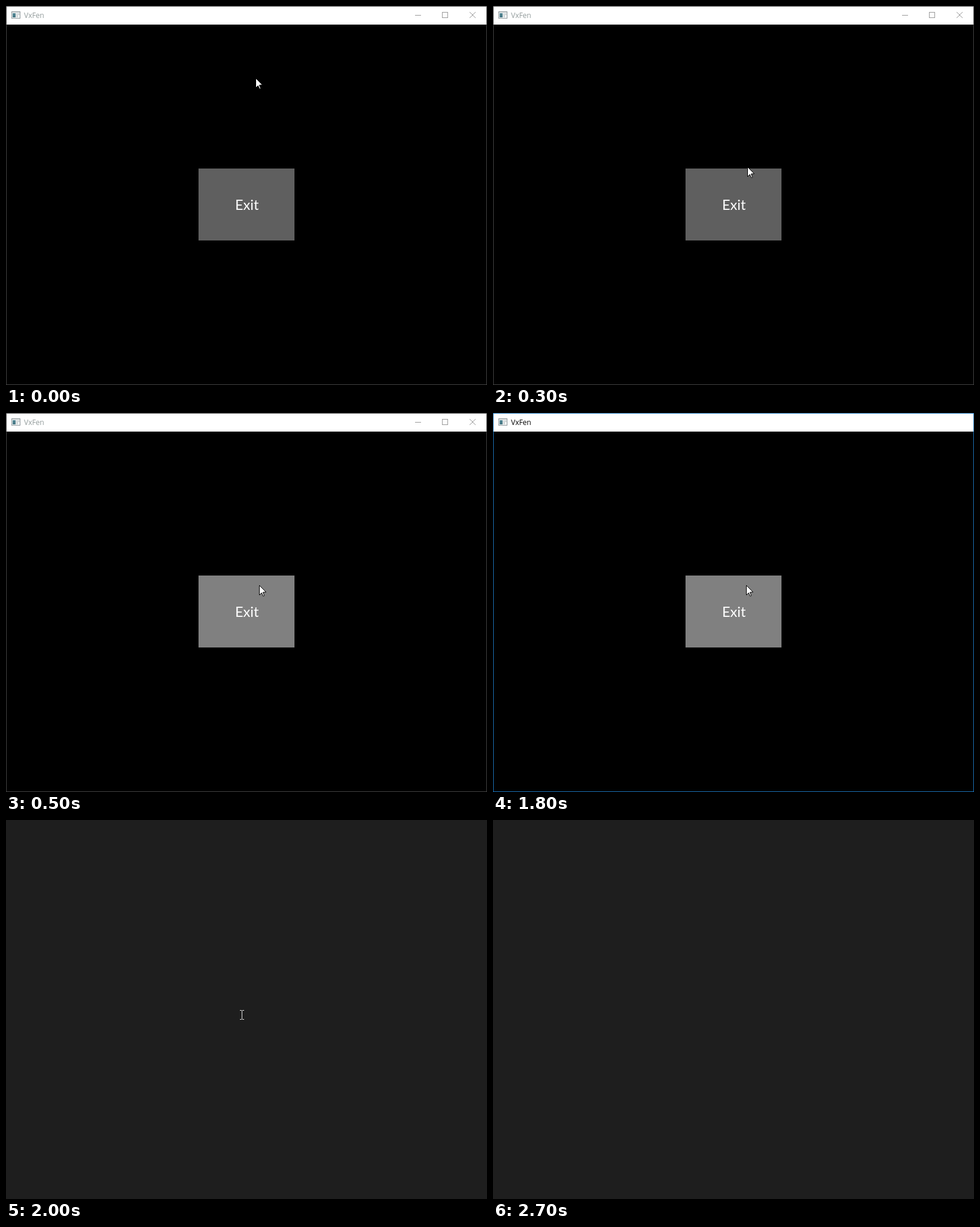
Animation of 802 by 632 pixels, one loop 3000 ms. Source, as an HTML page with a canvas:

```html
<!DOCTYPE html>
<html lang="en">
<head>
<meta charset="utf-8">
<title>VxFen</title>
<style>
html, body { margin: 0; width: 100%; height: 100%; overflow: hidden; background: #1e1e1e; }
canvas { display: block; }
</style>
</head>
<body>
<canvas id="stage" width="802" height="632"></canvas>
<script>
const W = 802, H = 632, LOOP = 3000, STEP = 100;
const ctx = document.getElementById('stage').getContext('2d');

// Pointer paths: [time, x, y]
const ARROW = [[0, 416, 120], [300, 424, 268], [400, 423, 284], [500, 422, 287]];
const BEAM = [[1900, 424, 290], [2000, 393, 325], [2300, 236, 466], [2600, 77, 602]];

function along(path, t) {
  const last = path[path.length - 1];
  if (t >= last[0]) return [last[1], last[2]];
  const i = path.findIndex(p => p[0] > t);
  const [t0, x0, y0] = path[i - 1];
  const [t1, x1, y1] = path[i];
  const k = (t - t0) / (t1 - t0);
  return [Math.round(x0 + (x1 - x0) * k), Math.round(y0 + (y1 - y0) * k)];
}

function box(color, x, y, w, h) {
  ctx.fillStyle = color;
  ctx.fillRect(x, y, w, h);
}

function label(text, font, color, x, y) {
  ctx.font = font;
  ctx.fillStyle = color;
  ctx.fillText(text, x, y);
}

function trace(points, close) {
  ctx.beginPath();
  points.forEach(([x, y]) => ctx.lineTo(x, y));
  if (close) ctx.closePath();
}

function drawIcon() {
  box('#8f989c', 9, 9, 15, 12);
  box('#f4f6f6', 10, 10, 13, 10);
  box('#c9cfd1', 10, 10, 13, 1);
  const g = ctx.createLinearGradient(11, 12, 16, 19);
  g.addColorStop(0, '#5b8f9d');
  g.addColorStop(1, '#3f6f7c');
  box(g, 11, 12, 5, 7);
  box('#d3d8da', 17, 12, 3, 7);
  box('#a9b1b5', 21, 12, 1, 3);
}

function drawControls() {
  ctx.strokeStyle = '#999';
  ctx.lineWidth = 1;
  box('#999', 682, 15, 10, 1);
  ctx.strokeRect(727.5, 10.5, 9, 9);
  trace([[773, 10], [783, 20]]);
  ctx.stroke();
  trace([[783, 10], [773, 20]]);
  ctx.stroke();
}

function drawWindow(active, hover) {
  box(active ? '#1b73b8' : '#434343', 0, 0, W, H);
  box('#fff', 1, 1, W - 2, 30);
  box('#000', 1, 31, W - 2, H - 32);
  drawIcon();
  label('VxFen', '12px "Open Sans", "Noto Sans", sans-serif', active ? '#000' : '#929b9b', 30, 20);
  if (!active) drawControls();
  box(hover ? '#808080' : '#5f5f5f', 321, 271, 160, 120);
  label('Exit', '23.5px Lato, sans-serif', '#fff', 382, 340);
}

function drawArrow([x, y]) {
  ctx.save();
  ctx.translate(x, y);
  trace([[.5, .5], [.5, 16.5], [4.2, 12.9], [6.8, 18.4], [8.8, 17.6], [6.4, 12], [11.6, 11.7]], true);
  ctx.fillStyle = '#fff';
  ctx.fill();
  ctx.strokeStyle = '#000';
  ctx.lineWidth = 1;
  ctx.stroke();
  ctx.restore();
}

function drawBeam([x, y]) {
  for (const row of [y - 8, y + 7]) {
    box('#e1e1e1', x - 3, row, 3, 1);
    box('#e1e1e1', x + 1, row, 3, 1);
  }
  box('#e1e1e1', x, y - 7, 1, 14);
}

function render(t) {
  box('#1e1e1e', 0, 0, W, H);
  if (t < 1900) {
    drawWindow(t >= 1800, t >= 400);
    drawArrow(along(ARROW, t));
    return;
  }
  if (t < 2000) {
    // Closing window shrinks and fades
    ctx.save();
    ctx.globalAlpha = 0.41;
    // Flatten first so that overlapping layers fade as one
    ctx.translate(400.2, 315.6);
    ctx.scale(0.972, 0.972);
    ctx.translate(-W / 2, -H / 2);
    ctx.drawImage(closing, 0, 0);
    ctx.restore();
  }
  if (t < 2700) drawBeam(along(BEAM, t));
}

const closing = document.createElement('canvas');
closing.width = W;
closing.height = H;
drawWindow(true, true);
closing.getContext('2d').drawImage(ctx.canvas, 0, 0);

const start = performance.now();
function tick() {
  const t = (performance.now() - start) % LOOP;
  render(Math.floor(t / STEP) * STEP);
  requestAnimationFrame(tick);
}
tick();
</script>
</body>
</html>
```
